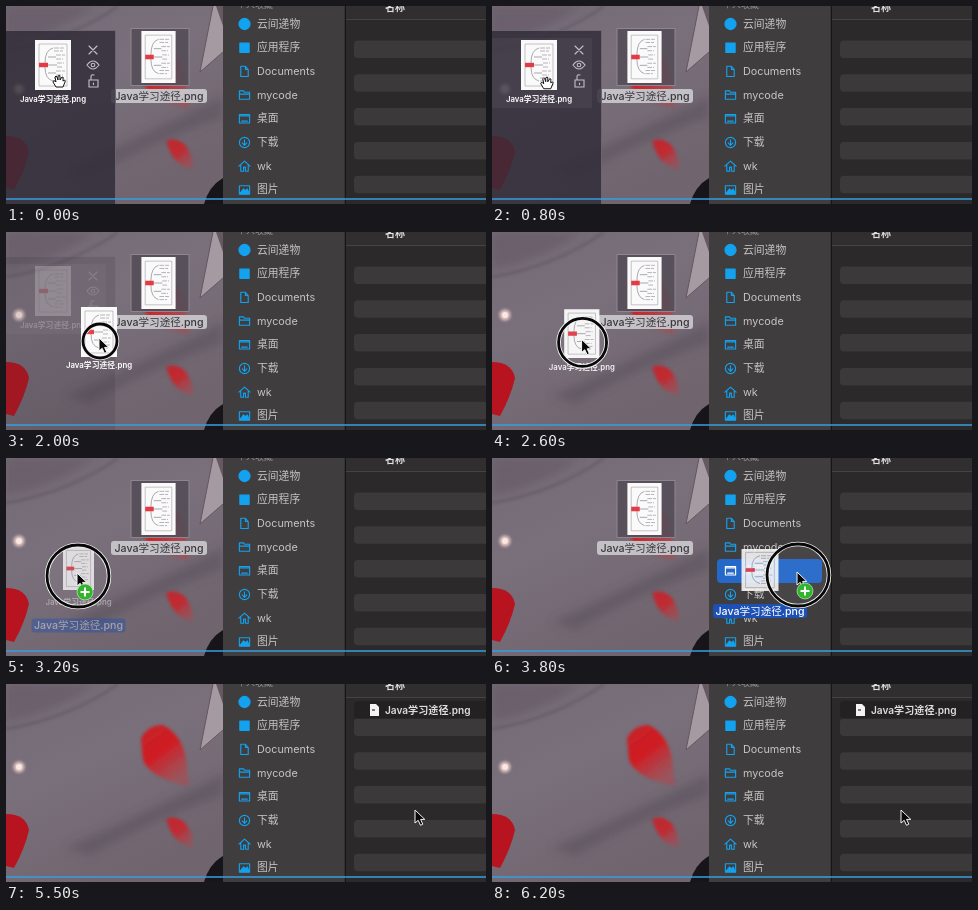
Animation of 480 by 198 pixels, one loop 7800 ms. Source, as an HTML page:

```html
<!DOCTYPE html>
<html lang="zh">
<head>
<meta charset="utf-8">
<title>拖放文件</title>
<style>
html, body { margin: 0; width: 100%; height: 100%; overflow: hidden; background: #2b292a; }
svg { display: block; width: 100vw; height: 100vh; }
text { font: 400 10.8px Inter, "Noto Sans CJK SC", sans-serif; dominant-baseline: central; }
.fileName { font-size: 10.6px; font-weight: 500; }
.mid { text-anchor: middle; }
.small { font-size: 7.8px; font-weight: 600; fill: #fff; }
.line { fill: none; stroke: #12a2f0; stroke-width: 1.2; stroke-linejoin: round; stroke-linecap: round; }
.tool { fill: none; stroke: #c3c0c8; stroke-width: 1.1; stroke-linecap: round; }
</style>
</head>
<body>
<svg viewBox="0 0 480 198" preserveAspectRatio="none">
  <defs>
    <linearGradient id="sky" x2=".5" y2="1">
      <stop offset="0" stop-color="#736a75"/><stop offset=".45" stop-color="#7a707b"/><stop offset="1" stop-color="#70656f"/>
    </linearGradient>
    <linearGradient id="petal" x2=".6" y2="1">
      <stop offset="0" stop-color="#c4242b"/><stop offset=".5" stop-color="#d01c22"/><stop offset="1" stop-color="#c33a42" stop-opacity=".45"/>
    </linearGradient>
    <filter id="soft" x="-30%" y="-30%" width="160%" height="160%"><feGaussianBlur stdDeviation="1.8"/></filter>
    <filter id="wide" x="-30%" y="-30%" width="160%" height="160%"><feGaussianBlur stdDeviation="4"/></filter>
    <clipPath id="desk"><path d="M0 0H217V198H0z"/></clipPath>
    <!-- mind map page, 36 x 50, centred on the origin -->
    <g id="page">
      <path d="M-18-25H18V25H-18z" fill="#fbfafb"/>
      <path d="M-14-21H14V21H-14z" fill="none" stroke="#aaa7ac" stroke-width=".7"/>
      <path d="M-8-2Q-8-15 0-17M-8 2Q-8 14 0 16M-5-8H3M-5 8H3M-5 0H4" fill="none" stroke="#87838a" stroke-width=".7"/>
      <path d="M1-17H11M1-14H10M3-10H12M3-6H10M4-2H11M4 2H9M3 6H12M3 10H10M1 13H11M1 16H9" stroke="#a5a1a7" stroke-width=".8" stroke-dasharray="5 1"/>
      <path d="M-14-2.200H-5V2.200H-14z" fill="#e23b45"/>
    </g>
  </defs>

  <g clip-path="url(#desk)">
    <path d="M0 0H217V198H0z" fill="url(#sky)"/>
    <g filter="url(#wide)" fill="#5c525e">
      <path d="M60 164Q140 128 217 90V112Q150 134 84 172z" opacity=".6"/>
      <path d="M0 0H90Q50 28 0 38z" opacity=".4"/>
    </g>
    <path d="M0 45Q65 34 112 0" fill="none" stroke="#574e59" stroke-width="2" opacity=".6" filter="url(#soft)"/>
    <path d="M207 0L194 66L217 46V0z" fill="#a59aa1"/>
    <path d="M210 0L217 20V0z" fill="#665861"/>
    <path d="M207 0L194 66L217 46" fill="none" stroke="#65565f"/>
    <path d="M217 172Q203 180 198 198H217z" fill="#17141a"/>
    <g filter="url(#soft)" fill="url(#petal)">
      <path d="M135 54Q142 41 157 41Q176 51 180 75L183 102Q145 95 137 76z"/>
      <path d="M160 135Q170 130 180 140Q189 155 187 163Q168 162 160 135z" opacity=".85"/>
    </g>
    <path d="M0 130Q20 130 23 146Q19 164 8 184L0 182z" fill="#b8141f"/>
    <circle cx="13" cy="83" r="5.500" fill="#e4c5c3" filter="url(#soft)"/>
    <circle cx="13" cy="83" r="3" fill="#f8e8e2"/>
  </g>

  <g id="deskFile">
    <path d="M125 22.5H183V79.5H125z" fill="#554e58" fill-opacity=".9" stroke="#8d8690"/>
    <use href="#page" transform="translate(152.500 51) scale(.95 1.04)"/>
    <rect x="105" y="83" width="96" height="14" rx="3" fill="#c4c1c6"/>
    <text class="mid fileName" x="153" y="90" fill="#3a373b"></text>
  </g>

  <g id="panel">
    <path d="M-1 24.500H109.500V199H-1z" fill="#322d38" fill-opacity=".84" stroke="#6a6570"/>
    <path id="hover" d="M0 32H100V102H0z" fill="#fff" fill-opacity=".13"/>
    <use href="#page" x="47" y="59"/>
    <text class="mid fileName small" x="47" y="93"></text>
    <g class="tool">
      <path d="M83 40L91 48M91 40L83 48"/>
      <path d="M81 59Q87 51 93 59Q87 67 81 59z"/><circle cx="87" cy="59" r="1.800"/>
      <path d="M83 74H92V81H83zM85 74V71Q85 68 88 69M87.500 77V78.500"/>
    </g>
  </g>

  <path d="M217 0H340V198H217z" fill="#403d3e"/>
  <path d="M339.500 0V198" stroke="#171617" stroke-width="1.500"/>
  <path d="M340 0H480V198H340z" fill="#2b292a"/>
  <path d="M340 0H480V13H340z" fill="#302e2f"/>
  <path d="M340 13.500H480" stroke="#454344"/>
  <g id="stripes" fill="#3b393a"></g>
  <text x="231" y="-2" fill="#929092" style="font-size:9px">个人收藏</text>
  <text x="379" y="1" fill="#e2e0e1" style="font-size:10px;font-weight:700">名称</text>
  <g id="listed">
    <rect x="348" y="17" width="140" height="17.500" rx="4" fill="#232122"/>
    <path d="M364 20H370L373 23V32H364z" fill="#f4f2f3"/><path d="M366 26H369" stroke="#555" stroke-width="1.500"/>
    <text class="fileName" x="379" y="26" fill="#dfdddf" style="font-size:10.1px;font-weight:600"></text>
  </g>
  <rect id="target" x="225" y="101" width="105" height="24" rx="4" fill="#2468c9"/>
  <g id="sidebar"></g>
  <path d="M0 193H480" stroke="#369ee0" stroke-width="1.700"/>

  <g id="drag">
    <use id="dragPage" href="#page"/>
    <text id="dragSmall" class="mid fileName small"></text>
    <g id="dragLabel">
      <rect x="-47" y="-7" width="94" height="14" rx="3" fill="#1d50b4"/>
      <text class="mid fileName" fill="#fff"></text>
    </g>
  </g>
  <g id="pointer">
    <g id="ring">
      <circle id="halo" cx="1" cy="3" fill="#fff" fill-opacity=".04" stroke="#f4f4f4" stroke-width="4.500"/>
      <circle id="loop" cx="1" cy="3" fill="none" stroke="#080808" stroke-width="2.800"/>
    </g>
    <path id="arrow" d="M0 0V13L3.200 10.300L5.500 15.300L7.800 14.200L5.600 9.400H9.800z" fill="#080808" stroke="#f5f5f5"/>
    <path id="hand" d="M-3 6L-6 1Q-6-1-4 0L-3 1L-4-4Q-3-6-2-4L-1-1V-5Q1-7 1-4V-1L3-4Q5-4 4-2L4 0Q7-2 6 1L4 6z" fill="#fff" stroke="#111"/>
    <g id="plus" transform="translate(8 19)">
      <circle r="8" fill="#30b52d" stroke="#d8f0d6" stroke-width=".6"/>
      <path d="M-4.500 0H4.500M0-4.500V4.500" stroke="#fff" stroke-width="2"/>
    </g>
  </g>
</svg>
<script>
const LOOP = 7800, STEP = 100;
const FILE_NAME = 'Java学习途径.png';
const el = id => document.getElementById(id);

document.querySelectorAll('.fileName').forEach(node => node.textContent = FILE_NAME);

// Icon paths are centred on the origin.
const places = [
  ['云间递物', '<circle r="6" fill="#12a2f0"/>'],
  ['应用程序', '<rect x="-5" y="-5" width="10" height="10" fill="#12a2f0"/>'],
  ['Documents', '<path d="M-4-5.500H1L4-2V5.500H-4zM1-5.500V-2H4"/>'],
  ['mycode', '<path d="M-5.500-4.500H-1L0-3H5.500V4.500H-5.500zM-5.500-1H5.500"/>'],
  ['桌面', '<path d="M-5.500-4.500H5.500V4.500H-5.500zM-5-3H5M-3 2.500H3"/>'],
  ['下载', '<circle r="5.500"/><path d="M0-3V3M-2.500 .5L0 3L2.500 .5"/>'],
  ['wk', '<path d="M-6 0L0-5.500L6 0M-4-1V5.500H-1V1H1V5.500H4V-1"/>'],
  ['图片', '<path d="M-5.500-4.500H5.500V4.500H-5.500z"/><path d="M-5 4L-1-1L1 1L3-1L5 4z" fill="#12a2f0"/>']
];
el('sidebar').innerHTML = places.map(([name, icon], i) => {
  const y = 18 + i * 23.7;
  return `<g class="line" transform="translate(238.500 ${y}) scale(.93)">${icon}</g>
    <text x="251" y="${y}" fill="#c6c4c6">${name}</text>`;
}).join('');
const targetIcon = el('sidebar').querySelectorAll('.line')[4];

el('stripes').innerHTML = [0, 1, 2, 3, 4].map(i =>
  `<rect x="348" y="${34.5 + i * 33.8}" width="140" height="17.5" rx="4"/>`).join('');

// Each key is [time, ...values]; values ease from key to key.
const track = (t, keys) => {
  const next = keys.findIndex(key => key[0] > t);
  if (next === 0) return keys[0].slice(1);
  if (next < 0) return keys.at(-1).slice(1);
  const a = keys[next - 1], b = keys[next];
  const u = (t - a[0]) / (b[0] - a[0]), k = u * u * (3 - 2 * u);
  return a.slice(1).map((v, i) => v + (b[i + 1] - v) * k);
};

const cursorPath = [[600, 53, 75], [1100, 58, 80], [1600, 58, 80], [2000, 93, 106],
  [2400, 93, 106], [3200, 71, 115], [3800, 305, 114], [4100, 305, 114], [4600, 409, 126]];
// Page centre, then width and height.
const pagePath = [[1600, 47, 59, 36, 50], [2000, 93, 100, 36, 50], [2400, 93, 100, 36, 50],
  [3200, 72.5, 110.5, 31, 43], [3800, 268, 112, 37, 42]];

const move = (id, x, y, extra = '') => el(id).setAttribute('transform', `translate(${x} ${y})${extra}`);
const fade = (id, value) => el(id).setAttribute('opacity', value);
const show = (id, on) => el(id).setAttribute('display', on ? 'inline' : 'none');

function render(t) {
  const [x, y] = track(t, cursorPath);
  const pressed = t >= 1500 && t < 4100;
  move('pointer', x, y);
  show('hand', t < 1500);
  show('arrow', t >= 1500);
  show('ring', pressed);
  show('plus', t >= 2800 && t < 4100);
  const [radius] = track(t, [[2000, 17], [3200, 31]]);
  el('halo').setAttribute('r', radius);
  el('loop').setAttribute('r', radius);

  fade('hover', track(t, [[600, 0], [1100, 1]]));
  fade('panel', track(t, [[1600, 1], [2000, .2], [2200, 0]]));

  const [px, py, w, h] = track(t, pagePath);
  show('drag', t > 1600 && t < 4100);
  move('dragPage', px, py, ` scale(${w / 36} ${h / 50})`);
  fade('dragPage', track(t, [[2400, 1], [3200, .78], [3800, .88]]));
  move('dragSmall', px, py + 33);
  fade('dragSmall', track(t, [[2400, 1], [3200, .4], [3400, 0]]));
  move('dragLabel', px, py + track(t, [[3200, 57], [3800, 41]])[0]);
  fade('dragLabel', track(t, [[2900, 0], [3200, .4], [3500, 1]]));

  const over = t >= 3700 && t < 4200;
  show('target', over);
  targetIcon.style.stroke = over ? '#fff' : '';
  show('deskFile', t < 4200);
  show('listed', t >= 5000);
}

function tick(now) {
  render(Math.floor(now % LOOP / STEP) * STEP);
  requestAnimationFrame(tick);
}
render(0);
requestAnimationFrame(tick);
</script>
</body>
</html>
```
